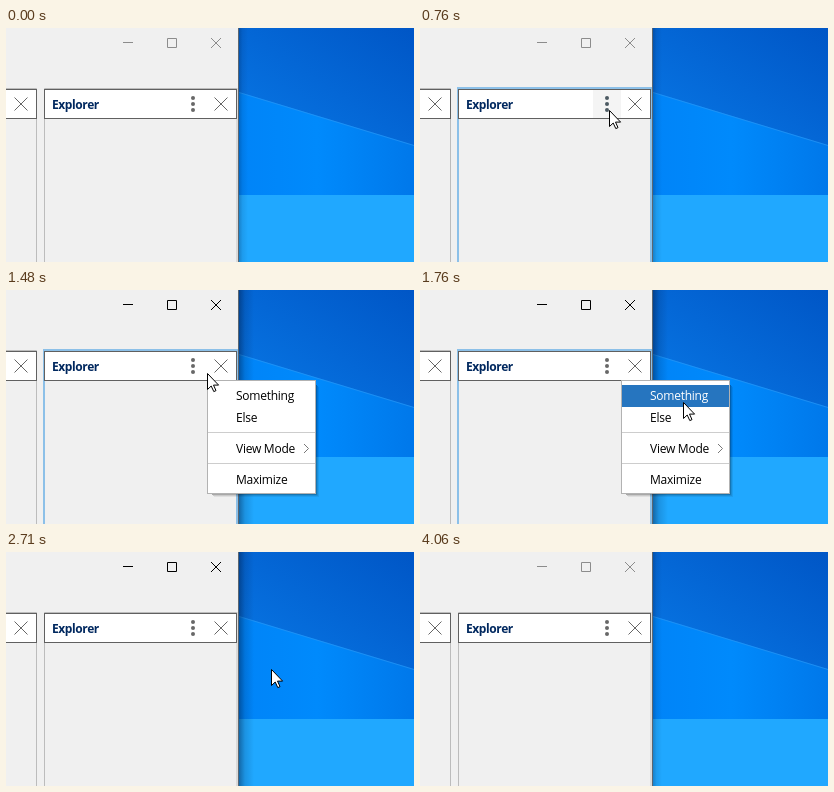
An HTML page that plays this animation: 408 by 234 pixels, repeating every 4.19 s.

```html
<!DOCTYPE html>
<html lang="en">
<head>
<meta charset="utf-8">
<title>Panel menu</title>
<style>
html, body { margin: 0; width: 100%; height: 100%; overflow: hidden; }
svg { display: block; width: 100vw; height: 100vh; }
text { font: 12px "Open Sans", "Noto Sans", sans-serif; letter-spacing: -.25px; white-space: pre; }
.title { font-weight: 700; letter-spacing: -.4px; fill: #00285f; }
.line { fill: none; stroke-width: 1; }
</style>
</head>
<body>
<svg viewBox="0 0 408 234" preserveAspectRatio="none">
  <defs>
    <linearGradient id="sky" x1="0" y1="1" x2="1" y2="0">
      <stop offset="0" stop-color="#0878e6"/><stop offset="1" stop-color="#0056c6"/>
    </linearGradient>
    <linearGradient id="beam" x1="0" y1="0" x2="1" y2="0">
      <stop offset="0" stop-color="#0084f8"/><stop offset=".45" stop-color="#008afc"/><stop offset="1" stop-color="#0078ea"/>
    </linearGradient>
    <linearGradient id="shade">
      <stop offset="0" stop-color="#001030" stop-opacity=".42"/>
      <stop offset=".4" stop-color="#001030" stop-opacity=".14"/>
      <stop offset="1" stop-color="#001030" stop-opacity="0"/>
    </linearGradient>
  </defs>

  <rect x="233" width="175" height="118" fill="url(#sky)"/>
  <path d="M233 64L408 117V234H233Z" fill="url(#beam)"/>
  <path d="M233 64.5L408 117.5" class="line" stroke="#2a96f4" stroke-opacity=".7"/>
  <rect x="233" y="167" width="175" height="175" fill="#20a8ff"/>
  <rect id="edge" x="233" width="15" height="234" fill="url(#shade)"/>

  <rect width="232" height="234" fill="#f0f0f0"/>
  <path d="M232.5 0V234" class="line" stroke="#5c6670"/>
  <g id="controls" class="line">
    <path d="M117 14.5H127M161.5 10.5H170.5V19.5H161.5ZM205 10L215 20M215 10L205 20"/>
  </g>

  <path d="M-1 60.5H30.5V235M38.5 235V60.5H231" class="line" stroke="#bcbcbc"/>
  <path d="M231 60V234" class="line" stroke="#c4c4c4"/>
  <path id="focus" d="M38 235V60H231V235" class="line" stroke="#8cc0e8" style="stroke-width:2"/>
  <g fill="#fff" stroke="#606060">
    <rect x="-5.5" y="61.5" width="36" height="29"/>
    <rect x="38.5" y="61.5" width="192" height="29"/>
  </g>
  <rect id="hover" x="173" y="62" width="28" height="28" fill="#f4f4f4"/>
  <path d="M8.5 69.5l13 13m0-13l-13 13M208.5 69.5l13 13m0-13l-13 13" class="line" stroke="#666"/>
  <g id="dots"><circle cx="187" cy="70" r="2"/><circle cx="187" cy="76" r="2"/><circle cx="187" cy="82" r="2"/></g>
  <text x="46" y="81" class="title">Explorer</text>

  <g id="shadow" class="line" stroke="#000">
    <path d="M310.5 95V204.5H206" opacity=".3"/>
    <path d="M311.5 96V205.5H207" opacity=".16"/>
    <path d="M312.5 97V206.5H208" opacity=".07"/>
  </g>
  <g id="menu">
    <rect x="201.5" y="90.5" width="108" height="113" fill="#fff" stroke="#b2b2b2"/>
    <rect id="pick" x="202" width="107" height="22" fill="#2675bf"/>
    <path d="M202 142.5H309M202 173.5H309" class="line" stroke="#cdcdcd"/>
    <path d="M298 154l4.5 4.5-4.5 4.5" class="line" stroke="#777"/>
    <text id="first" x="230" y="110">Something</text>
    <text id="second" x="230" y="132">Else</text>
    <text x="230" y="163">View Mode</text>
    <text x="230" y="194">Maximize</text>
  </g>
  <path id="cursor" d="M.5 .5V16.5L4.2 13 6.8 18.6 9 17.6 6.5 12.1H11.6Z" fill="#fff" stroke="#000"/>
</svg>
<script>
const LOOP = 4190;
const $ = id => document.getElementById(id);
const show = (id, on) => $(id).style.display = on ? "" : "none";

// Each move: refresh interval, then [time, x, y] points.
const moves = [
  [23, [60, 292, 194], [83, 284, 181], [106, 274, 169], [129, 267, 161]],
  [26, [330, 263, 159], [408, 226, 140], [460, 204, 128], [560, 196, 104], [680, 190, 86], [840, 188, 77]],
  [25, [1430, 189, 77], [1530, 212, 88], [1640, 247, 104], [1755, 263, 112]],
  [30, [2350, 265, 116], [2380, 265, 117]],
  [25, [3380, 278, 128], [3480, 302, 153], [3600, 341, 193], [3705, 372, 229]]
];

function pointer(t) {
  const [step, ...pts] = moves.filter(m => m[1][0] <= t).pop();
  const start = pts[0][0];
  const q = start + Math.floor((t - start) / step) * step;
  const i = pts.findIndex(p => p[0] > q);
  if (i < 0) return pts[pts.length - 1].slice(1);
  const a = pts[i - 1], b = pts[i], u = (q - a[0]) / (b[0] - a[0]);
  return [1, 2].map(k => Math.round(a[k] + (b[k] - a[k]) * u));
}

function draw(t) {
  const visible = t >= 60 && t < 3730;
  const [x, y] = visible ? pointer(t) : [-50, -50];
  show("cursor", visible);
  $("cursor").setAttribute("transform", `translate(${x} ${y})`);

  const active = t >= 950 && t < 4060;
  $("controls").setAttribute("stroke", active ? "#000" : "#8c8c8c");
  $("edge").setAttribute("width", active ? 15 : 9);
  $("edge").setAttribute("opacity", active ? 1 : .6);

  const hot = visible && t < 1090 && x >= 173 && x < 201 && y < 90;
  show("focus", t >= 408 && t < 2350);
  show("hover", hot);
  $("dots").setAttribute("fill", hot ? "#4c5a62" : "#686868");

  const open = t >= 1090 && t < 2590;
  const row = x < 202 || y < 95 ? -1 : y < 116 ? 0 : 1;
  show("menu", open);
  show("shadow", t >= 1070 && t < 2710);
  show("pick", row >= 0);
  $("pick").setAttribute("y", row > 0 ? 116 : 95);
  ["first", "second"].forEach((id, i) => $(id).setAttribute("fill", i === row ? "#fff" : "#000"));
}

const began = performance.now();
function tick() {
  draw((performance.now() - began) % LOOP);
  requestAnimationFrame(tick);
}
tick();
</script>
</body>
</html>
```
